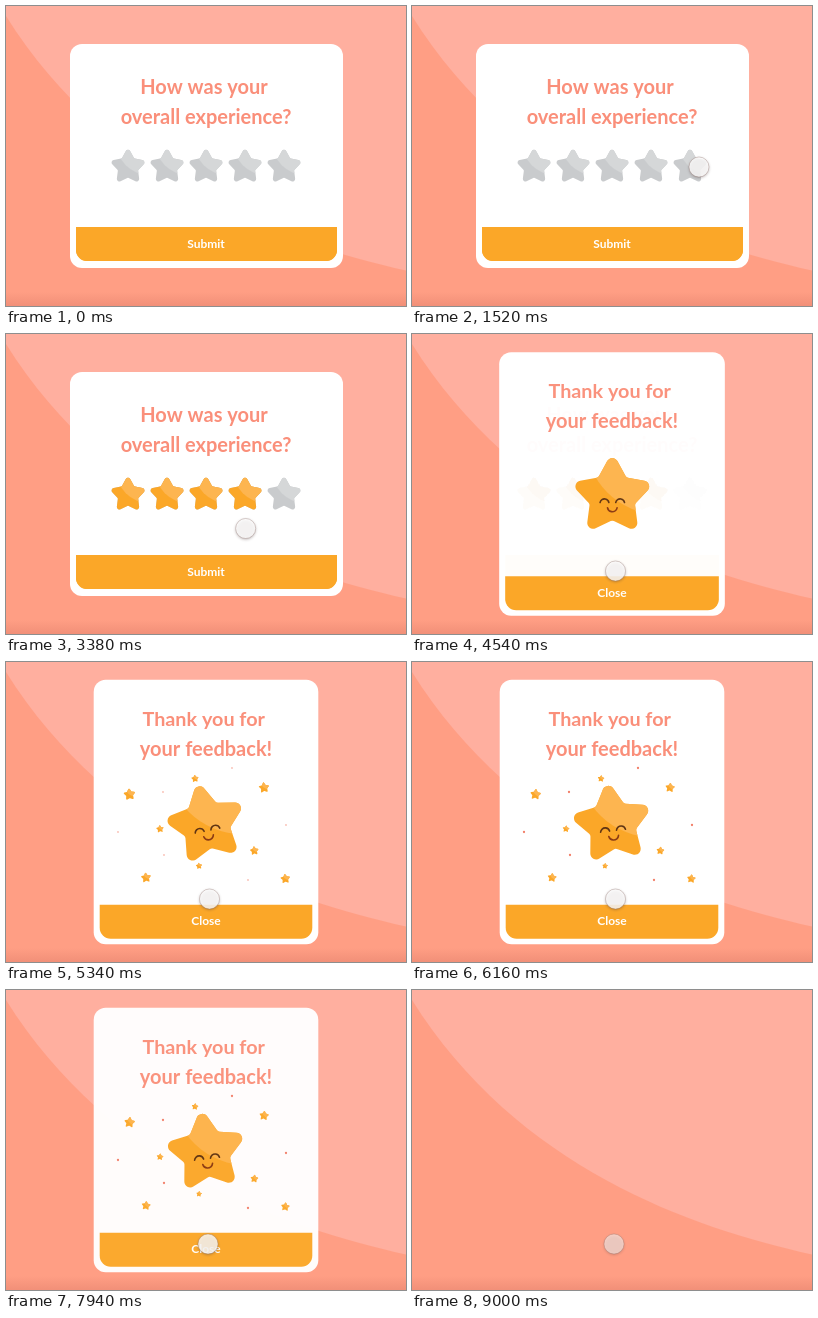
These frames come from a looping animation (400 px wide and 300 px high, 9.02 s). An HTML page with a canvas:

```html
<!DOCTYPE html>
<html lang="en">
<head>
<meta charset="utf-8">
<title>Rating card</title>
<style>
  html, body { margin: 0; width: 100%; height: 100%; overflow: hidden; background: #ff9e84; }
  canvas { display: block; width: 400px; height: 300px; }
</style>
</head>
<body>
<canvas id="stage"></canvas>
<script>
const LOOP = 9020, TAU = Math.PI * 2;
const canvas = document.getElementById('stage');
const dpr = window.devicePixelRatio || 1;
canvas.width = 400 * dpr;
canvas.height = 300 * dpr;
const ctx = canvas.getContext('2d');

const ORANGE = ['#fba728', '#fdb550'];
const GREY = ['#c9cbcd', '#d5d7d8'];
const TITLE = '#fa8f7a';

const clamp = v => Math.max(0, Math.min(1, v));
const span = (t, a, b) => clamp((t - a) / (b - a));
const mix = (a, b, k) => a + (b - a) * k;
const easeOut = k => 1 - (1 - k) * (1 - k);
const easeInOut = k => k * k * (3 - 2 * k);

function background() {
  ctx.fillStyle = '#ff9e84';
  ctx.fillRect(0, 0, 400, 300);
  ctx.fillStyle = '#ffaf9f';
  ctx.beginPath();
  ctx.moveTo(0, 0);
  ctx.lineTo(0, 10);
  ctx.bezierCurveTo(105, 178, 280, 238, 400, 264.5);
  ctx.lineTo(400, 0);
  ctx.fill();
  const shade = ctx.createLinearGradient(0, 286, 0, 300);
  shade.addColorStop(0, 'rgba(200,100,85,0)');
  shade.addColorStop(1, 'rgba(200,100,85,.25)');
  ctx.fillStyle = shade;
  ctx.fillRect(0, 286, 400, 14);
}

function box(x, y, w, h, radii, fill) {
  ctx.fillStyle = fill;
  ctx.beginPath();
  ctx.roundRect(x, y, w, h, radii);
  ctx.fill();
}

function label(text, x, y, size, color) {
  ctx.font = `700 ${size}px Lato, sans-serif`;
  ctx.textAlign = 'center';
  ctx.fillStyle = color;
  ctx.fillText(text, x, y);
}

function faded(alpha, draw) {
  if (alpha <= 0) return;
  ctx.save();
  ctx.globalAlpha *= alpha;
  draw();
  ctx.restore();
}

function starPath(r) {
  const pts = [];
  for (let i = 0; i < 10; i++) {
    const a = i * Math.PI / 5 - Math.PI / 2, d = i % 2 ? r * .53 : r;
    pts.push([d * Math.cos(a), d * Math.sin(a)]);
  }
  const [last] = pts.slice(-1);
  ctx.beginPath();
  ctx.moveTo((last[0] + pts[0][0]) / 2, (last[1] + pts[0][1]) / 2);
  pts.forEach((p, i) => {
    const q = pts[(i + 1) % 10];
    ctx.arcTo(p[0], p[1], q[0], q[1], r * (i % 2 ? .08 : .13));
  });
  ctx.closePath();
}

function star(x, y, r, [base, light], tilt = 0, extra) {
  if (r <= 0) return;
  ctx.save();
  ctx.translate(x, y);
  ctx.rotate(tilt);
  starPath(r);
  ctx.fillStyle = base;
  ctx.fill();
  ctx.save();
  ctx.clip();
  ctx.fillStyle = light;
  ctx.beginPath();
  ctx.arc(1.06 * r, -1.26 * r, 1.655 * r, 0, TAU);
  ctx.fill();
  ctx.restore();
  if (extra) extra();
  ctx.restore();
}

function face(scale) {
  ctx.scale(scale, scale);
  ctx.lineWidth = 1.6;
  ctx.lineCap = 'round';
  ctx.strokeStyle = '#5f3413';
  for (const x of [-8, 8]) {
    ctx.beginPath();
    ctx.arc(x, 7, 4.6, Math.PI * 1.06, Math.PI * 1.94);
    ctx.stroke();
  }
  ctx.strokeStyle = '#8a3a14';
  ctx.beginPath();
  ctx.arc(0, 10.5, 5, Math.PI * .06, Math.PI * .94);
  ctx.stroke();
}

// x, y, radius of the scattered stars
const SPARKS = [
  [123.5, 132.5, 6.8], [258, 125.7, 6], [140, 215.7, 5.7], [279.3, 216.8, 5.5],
  [154, 167, 4.3], [248.3, 188.8, 5], [189, 116.7, 4.2], [193, 204, 3.6]
];
const DOTS = [[226, 106], [112, 170], [280, 163], [157, 130], [158, 193], [242, 218]];

function sparkles(t) {
  const grow = easeOut(span(t, 4600, 5120));
  if (!grow) return;
  const wave = Math.cos(TAU * (t - 6160) / 1760);
  const at = (x, y) => [mix(200, x, grow), mix(161, y, grow)];
  for (const [x, y, r] of SPARKS) {
    star(...at(x, y), r * grow * (.95 - .05 * wave), ORANGE, .1 * wave);
  }
  ctx.fillStyle = '#f2806a';
  for (const p of DOTS) {
    ctx.beginPath();
    ctx.arc(...at(...p), grow * (.9 + .25 * wave), 0, TAU);
    ctx.fill();
  }
}

function card(t) {
  const k = easeOut(span(t, 4200, 4600));
  const x = mix(64, 87.7, k), y = mix(38, 17.7, k);
  const w = mix(273, 224.6, k), h = 300 - 2 * y;
  box(x, y, w, h, 12, '#fff');

  const bar = top => box(x + 6, top, w - 12, 34, [0, 0, 11, 11], '#fba728');
  faded(1 - k, () => bar(221));
  bar(mix(221, 242.7, k));

  faded(1 - k, () => {
    label('How was your', 198, 88, 20, TITLE);
    label('overall experience?', 200, 118, 20, TITLE);
    label('Submit', 200, 241.5, 12, '#fff');
  });
  faded(k, () => {
    label('Thank you for', 197.7, 63.7, 19.8, TITLE);
    label('your feedback!', 200, 94.3, 20, TITLE);
    label('Close', 200, 262.7, 12, '#fff');
  });

  faded(1 - k, () => {
    for (let i = 0; i < 5; i++) {
      if (i === 2 && k > 0) continue;
      const px = 122 + 39 * i, on = i < 4 ? span(t, 2120 + 140 * i, 2200 + 140 * i) : 0;
      star(px, 161, 20, GREY);
      faded(on, () => star(px, 161, 20, ORANGE));
    }
  });

  sparkles(t);
  if (k > 0) {
    const lean = easeInOut(span(t, 4600, 5000));
    const deg = lean * (-9.2 + 2.3 * Math.cos(TAU * (t - 6160) / 1760));
    star(200.3, mix(161, 162.6, k), mix(20, 45.4, k), ORANGE,
      deg * Math.PI / 180, () => faded(k, () => face(k)));
  }
}

// start, end, then the quadratic path: from, bend, to
const MOVES = [
  [340, 660, 413, 45, 392, 46, 373, 48],
  [840, 1520, 373, 48, 345, 130, 287, 161],
  [1520, 2040, 287, 161, 190, 142, 84, 152],
  [2040, 2660, 84, 152, 160, 160, 246, 162],
  [3000, 3900, 246, 162, 246, 207, 203.5, 237],
  [7400, 7760, 203.5, 237, 204, 246, 202, 254]
];

function cursorAt(t) {
  let pos = [413, 45];
  for (const [a, b, x0, y0, x1, y1, x2, y2] of MOVES) {
    if (t < a) break;
    const u = easeInOut(span(t, a, b)), v = 1 - u;
    pos = [v * v * x0 + 2 * u * v * x1 + u * u * x2, v * v * y0 + 2 * u * v * y1 + u * u * y2];
  }
  return pos;
}

const press = (t, a, b) => Math.sin(Math.PI * span(t, a, b));

function cursor(t) {
  if (t < 340) return;
  const [x, y] = cursorAt(t);
  const r = 10 - press(t, 3910, 4010) - press(t, 7780, 7880);
  ctx.save();
  ctx.shadowColor = 'rgba(70,50,50,.45)';
  ctx.shadowBlur = 3 * dpr;
  ctx.shadowOffsetY = dpr;
  ctx.beginPath();
  ctx.arc(x, y, r, 0, TAU);
  ctx.fillStyle = `rgba(255,255,255,${mix(.82, .55, span(t, 7900, 8440))})`;
  ctx.fill();
  ctx.restore();
  ctx.lineWidth = .8;
  ctx.strokeStyle = 'rgba(150,120,115,.45)';
  ctx.stroke();
}

function frame(now) {
  const t = now % LOOP;
  ctx.setTransform(dpr, 0, 0, dpr, 0, 0);
  background();
  faded(1 - easeInOut(span(t, 7880, 8440)), () => card(t));
  cursor(t);
  requestAnimationFrame(frame);
}
requestAnimationFrame(frame);
</script>
</body>
</html>
```
